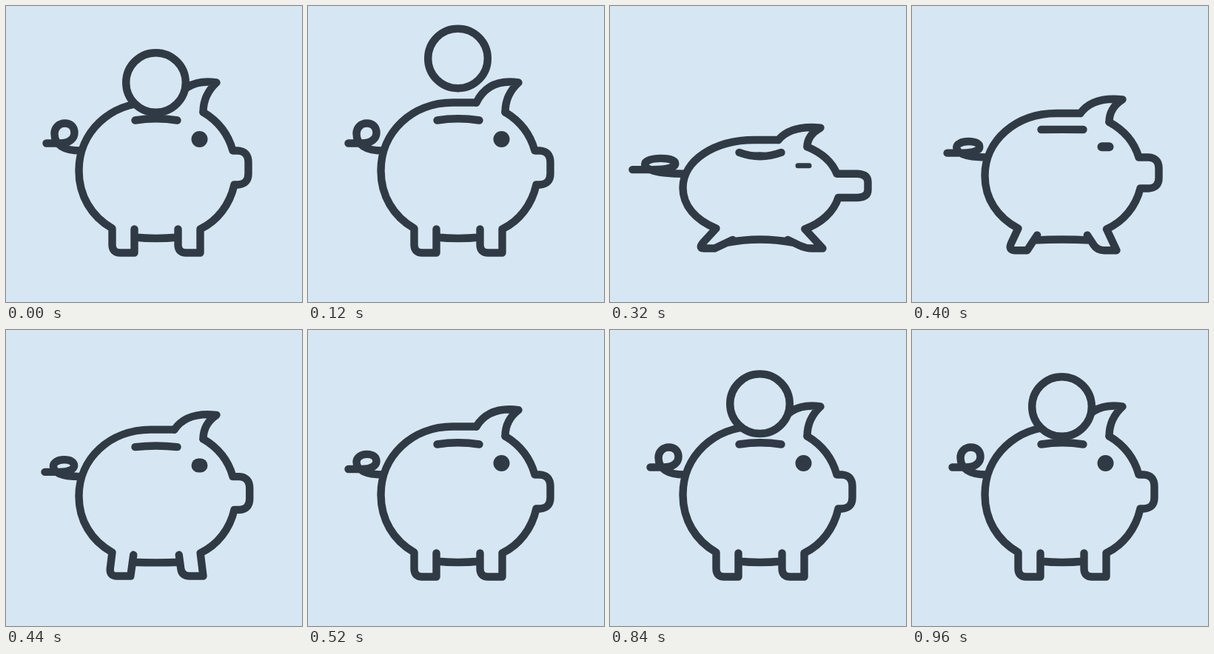
An HTML page that plays this animation: 400 px wide and 400 px high, repeating every 1040 ms.

```html
<!DOCTYPE html>
<html lang="en">
<head>
<meta charset="utf-8">
<title>Piggy bank</title>
<style>
  html, body { margin: 0; width: 100%; height: 100%; overflow: hidden; background: #d6e6f3; }
  svg { display: block; width: 100vw; height: 100vh; }
  .line { fill: none; stroke: #303a45; stroke-width: 10.4; stroke-linecap: round; stroke-linejoin: round; }
  #coin { fill: #d6e6f3; }
  #eye { fill: #303a45; }
</style>
</head>
<body>
<svg viewBox="0 0 400 400">
  <clipPath id="above"><path id="edge"/></clipPath>
  <g transform="translate(.5 .5)">
    <path id="tail" class="line"/>
    <path id="body" class="line"/>
    <path id="ear" class="line"/>
    <rect id="eye" x="250" width="22"/>
    <g clip-path="url(#above)"><circle id="coin" class="line" cx="202"/></g>
    <path id="slot" class="line"/>
  </g>
</svg>
<script>
const LOOP = 1040, STEP = 40;
const el = id => document.getElementById(id);

const BODY = `M227 130 L195 130 C140 130 98 170 98 222 C98 256 115 284 143 300
  L143 322 Q143 333 154 333 L173 333 L173 301 M173 312 Q202 315 232 312
  M232 301 L232 322 Q232 333 243 333 L262 333 L262 301
  C285 290 302 268 308 241 L313 241 Q327 240 327 226 L327 211 Q327 196 313 195
  L306 195 C300 173 286 155 266 143`;
const EAR = 'M227 130 C238 108 257 99 284 103 C273 113 266 127 266 143';
const TAIL = `M54 185 L72 185 C86 185 92 178 92 171 C92 163 87 158 79 158
  C71 158 65 164 65 172 C65 187 78 195 100 195`;

const warp = (path, move) => path.replace(/(\d+) (\d+)/g,
  (_, x, y) => move(+x, +y).map(v => v.toFixed(2)).join(' '));
const part = (t, from, to) => Math.min(1, Math.max(0, (t - from) / (to - from)));
const smooth = u => (1 - Math.cos(Math.PI * u)) / 2;

// The pig sinks when the coin lands; ear and tail follow later.
const squash = t => 3.5 * smooth(part(t, 240, 320)) * (1 - part(t, 320, 480)) ** 1.8;
const flop = t => 1.2 * Math.sin(Math.PI * part(t, 280, 600));

function coin(t) {
  if (t < 600) {
    const y = t < 150 ? 103 - 36 * smooth(t / 150) : 67 + 26 * ((t - 150) / 90) ** 3;
    return { cy: y, r: t < 360 ? 40.3 : 0 };
  }
  return {
    cy: 103 - 60 * (1 - part(t, 600, 960) ** 2) ** 4.7,
    r: 40.3 * (1 - (1 - part(t, 600, 800)) ** 1.5)
  };
}

const sink = (y, s) => y + (300 - y) * .085 * s;

// Legs splay outward from the hips, mirrored about the middle of the pig.
function leg(x, y, s) {
  const mid = 202.5, k = Math.min(s, 1.8);
  const inner = 59.5 - Math.abs(x - mid), down = y - 300;
  const dx = inner * (1 - .13 * k) - .42 * k * down;
  const dy = down * (1 - .1 * k) + .28 * k * inner * (1 - down / 33);
  return [mid + Math.sign(x - mid) * (59.5 - dx), 300 + dy];
}

function set(id, attrs) {
  for (const k in attrs) el(id).setAttribute(k, attrs[k]);
}

function draw(time) {
  const t = Math.floor(time % LOOP / STEP) * STEP;
  const s = squash(t), f = flop(t);

  set('body', { d: warp(BODY, (x, y) => y > 300 && Math.abs(x - 202) > 20
    ? leg(x, y, s)
    : [x > 310 ? x + 6 * s : x, sink(y, s)]) });
  set('ear', { d: warp(EAR, (x, y) =>
    [x, sink(y, s) + .2 * f * Math.max(0, 130 - y)]) });
  set('tail', { d: warp(TAIL, (x, y) =>
    [x - .15 * s * (100 - x), sink(y, s) + .3 * f * (195 - y)]) });

  const y = sink(154, s), bend = y - 4.5 + 4.3 * s;
  set('slot', { d: `M174 ${y} Q202 ${bend} 231 ${y}` });
  set('edge', { d: `M100 -50 V${y} H174 Q202 ${bend} 231 ${y} H300 V-50 Z` });

  const h = Math.max(7, 22 - 10 * s);
  set('eye', { y: sink(179.5, s) - h / 2, height: h, rx: h / 2 });

  const c = coin(t);
  set('coin', { ...c, visibility: c.r > 0 ? 'visible' : 'hidden' });
}

let start;
function tick(now) {
  start ??= now;
  draw(now - start);
  requestAnimationFrame(tick);
}
draw(0);
requestAnimationFrame(tick);
</script>
</body>
</html>
```
